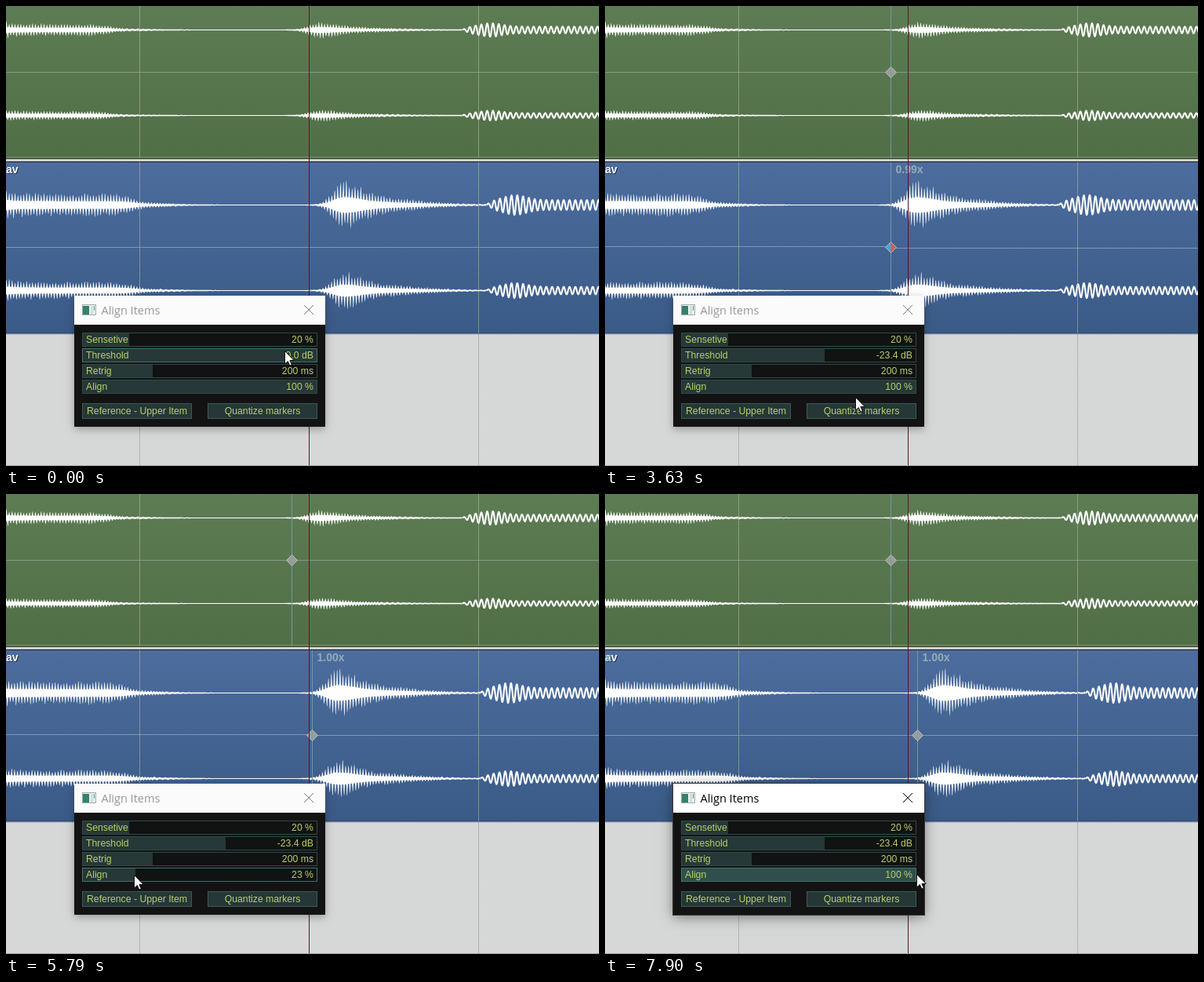
An HTML page with a canvas that plays this animation: 756 px wide and 586 px high, repeating every 8 s.

```html
<!DOCTYPE html>
<html lang="en">
<head>
<meta charset="utf-8">
<title>Align Items</title>
<style>
html, body { margin: 0; width: 100%; height: 100%; overflow: hidden; background: #d6d8d7; }
canvas { display: block; }
</style>
</head>
<body>
<canvas id="stage" width="756" height="586"></canvas>
<script>
const ctx = document.getElementById('stage').getContext('2d');
const W = 756, H = 586, LOOP = 8000;
const HOME = 398, REF = 364;
const DRAG_LAG = 65;
const GREY = '#989c9b', RED = '#c0645a', CYAN = '#48a5dc';
const SMALL = '12.25px "Liberation Sans", Arial, sans-serif';
const BOLD = 'bold 14px "Liberation Sans", Arial, sans-serif';
const TITLE = '14.5px "Open Sans", "Noto Sans", sans-serif';

// The picture advances in steps: six of 250 ms, then 266 ms each.
const stepAt = t => t < 1500 ? Math.floor(t / 250) : 6 + Math.floor((t - 1500) / 266);
const stepTime = i => i < 6 ? i * 250 : 1500 + (i - 6) * 266;

// Key poses of the mouse: ms, x, y.
const mousePath = [
  [0, 355, 439], [400, 355, 444], [1000, 301, 453], [1250, 280, 455], [1500, 280, 455],
  [1766, 321, 428], [2298, 395, 130], [2564, 394, 13], [3096, 385, 330], [3362, 292, 477],
  [3628, 319, 498], [4160, 384, 487], [4958, 248, 485], [5490, 170, 484], [6022, 156, 486],
  [6554, 96, 488], [7086, 96, 488], [7700, 397, 484], [LOOP, 397, 484]
];

function mouseAt(t) {
  const i = Math.max(1, mousePath.findIndex(p => p[0] >= t));
  const [t0, x0, y0] = mousePath[i - 1], [t1, x1, y1] = mousePath[i];
  const k = (t - t0) / (t1 - t0);
  return { x: x0 + (x1 - x0) * k, y: y0 + (y1 - y0) * k };
}

// Sliders follow the mouse slightly late.
function dragged(t) {
  const part = (mouseAt(t - DRAG_LAG).x - 97) / 300;
  return Math.min(1, Math.max(0, part));
}
const thresholdAt = t => t < 250 ? 1 : dragged(Math.min(t, 1500));
const alignAt = t => t < 4160 ? 1 : dragged(t);

// First and last step of every drag; the items are updated between them.
const drags = [[1, 6], [15, 17], [20, 21], [24, 25], [27, 30]];

function stateAt(t) {
  const step = stepAt(t), now = stepTime(step);
  const drag = drags.find(([a, b]) => step >= a && step <= b);
  const applied = alignAt(drag ? stepTime(drag[0] - 1) : now);
  return {
    mouse: mouseAt(now),
    threshold: thresholdAt(now),
    align: alignAt(now),
    focused: !!drag,
    held: step < 7 ? 1 : step < 15 ? -1 : 3,
    marked: step >= 7,
    applied: step < 7 ? 0 : applied
  };
}

function hash(n) {
  const v = Math.sin(n * 12.9898) * 43758.5453;
  return v - Math.floor(v);
}

const fadeOut = (x, center, width) => 1 / (1 + Math.exp((x - center) / width));
const bump = (x, center, rise, fall) => Math.exp(-(((x - center) / (x < center ? rise : fall)) ** 2));

// A decaying noise, a struck burst and a steady tone.
function loudness(x, p) {
  return p.noise * (fadeOut(x, 132, 8) + .22 * fadeOut(x, 190, 12) + .5 * Math.exp(-(x + p.offset) / 10))
    + p.burst * (.55 * bump(x, 400, 19, 28) + .45 * bump(x, 400, 19, 100))
    + p.tone * (fadeOut(-x, -588, 3) + bump(x, 618, 18, 20));
}

function makeWave(p, scale, seed) {
  const body = new Path2D(), tone = new Path2D();
  const toneStart = 582 + p.offset, lower = [];
  let phase = 0;
  body.moveTo(0, 0);
  for (let x = 0; x < toneStart; x += .5) {
    const level = loudness(x - p.offset, p) * scale;
    phase += .5 / (level < 2 ? 7 : 3.7);
    const spike = side => {
      const peak = .55 + .45 * hash(Math.floor(phase) * side + seed);
      return .6 + level * (.28 + .72 * peak * Math.max(0, side * Math.sin(phase * 2 * Math.PI)));
    };
    body.lineTo(x, -spike(1));
    lower.unshift([x, spike(-1)]);
  }
  lower.forEach(([x, y]) => body.lineTo(x, y));
  for (let x = toneStart; x < W + 50; x += .5) {
    const y = loudness(x - p.offset, p) * scale * Math.sin((x - toneStart) / 7.4 * 2 * Math.PI);
    tone.lineTo(x, -y);
  }
  return { body, tone };
}

const green = { offset: 0, noise: 6.5, burst: 11, tone: 4.3 };
const blue = { offset: 31, noise: 12.5, burst: 33, tone: 6.3 };
const greenWaves = [makeWave(green, 1, 1), makeWave(green, .72, 7)];
const blueWaves = [makeWave(blue, 1, 3), makeWave(blue, .76, 9)];

function rect(x, y, w, h, color) {
  ctx.fillStyle = color;
  ctx.fillRect(x, y, w, h);
}

function frame(x, y, w, h, color) {
  ctx.strokeStyle = color;
  ctx.lineWidth = 1;
  ctx.strokeRect(x + .5, y + .5, w - 1, h - 1);
}

function polygon(points, fill, stroke) {
  ctx.beginPath();
  points.forEach(p => ctx.lineTo(...p));
  ctx.closePath();
  ctx.fillStyle = fill;
  ctx.fill();
  if (!stroke) return;
  ctx.strokeStyle = stroke;
  ctx.lineWidth = 1;
  ctx.stroke();
}

function line(x0, y0, x1, y1, color) {
  ctx.beginPath();
  ctx.moveTo(x0, y0);
  ctx.lineTo(x1, y1);
  ctx.strokeStyle = color;
  ctx.lineWidth = 1;
  ctx.stroke();
}

function text(str, x, y, font, color, align = 'left') {
  ctx.font = font;
  ctx.fillStyle = color;
  ctx.textAlign = align;
  ctx.fillText(str, x, y);
}

function gradient(y, h, top, bottom) {
  const g = ctx.createLinearGradient(0, y, 0, y + h);
  g.addColorStop(0, top);
  g.addColorStop(1, bottom);
  rect(0, y, W, h, g);
}

function drawWaves(waves, shift, top) {
  waves.forEach((wave, i) => {
    ctx.save();
    ctx.translate(shift, top + i * 109);
    ctx.fillStyle = ctx.strokeStyle = '#fff';
    ctx.fill(wave.body);
    ctx.lineWidth = 2.1;
    ctx.lineJoin = 'round';
    ctx.stroke(wave.tone);
    ctx.restore();
  });
}

function drawGridLine(x) {
  ctx.setLineDash([1, 1]);
  line(x, 0, x, 194, '#b9c2ae');
  line(x, 199, x, 417, '#c6c09c');
  line(x, 418, x, 585, '#8d8f8e');
  ctx.setLineDash([]);
}

function drawDiamond(x, y, left, right) {
  const top = [x, y - 7], bottom = [x, y + 7];
  polygon([top, [x - 7, y], bottom], left);
  polygon([top, [x + 7, y], bottom], right);
  polygon([top, [x + 7, y], bottom, [x - 7, y]], 'transparent', 'rgba(205,212,210,.7)');
}

function drawTracks({ marked, applied }) {
  const x = Math.floor(HOME - (HOME - REF) * applied);
  rect(0, 0, W, H, '#d6d8d7');
  gradient(0, 194, '#5d7c54', '#516f47');
  rect(0, 84, W, 1, '#87998a');
  rect(0, 192, W, 1, '#78906f');
  rect(0, 194, W, 1, '#3c4b38');
  rect(0, 195, W, 3, '#d0d2d1');
  rect(0, 198, W, 1, '#15191f');
  gradient(199, 218, '#4c6d9d', '#3a5a87');
  rect(0, 416, W, 1, '#304c74');
  rect(0, 417, W, 1, '#7685a0');
  rect(0, 418, W, 1, '#b9bec4');
  rect(0, 585, W, 1, '#a0a2a1');
  rect(0, 307 - Math.ceil(applied), x, 1, '#8196b2');
  rect(x, 307 + Math.floor(applied), W - x, 1, '#8196b2');

  drawWaves(greenWaves, 0, 30.5);
  drawWaves(blueWaves, x - HOME, 253.5);
  [170.5, 602.5].forEach(drawGridLine);

  text('av', 1, 214, BOLD, '#22344f');
  text('av', 0, 213, BOLD, '#fff');
  if (marked) {
    const stretched = applied > .3;
    rect(REF, 0, 1, 194, '#7198a0');
    rect(x, 199, 1, 218, '#7399a0');
    drawDiamond(REF + .5, 84.5, GREY, GREY);
    drawDiamond(x + .5, 307.5, applied === 1 ? CYAN : GREY, stretched ? RED : GREY);
    text(stretched ? '0.99x' : '1.00x', x + 6.5, 213, BOLD, '#93abb9');
    if (!applied) text('x', 0, 213, BOLD, '#93b0b8');
  }
  rect(386, 0, 1, 585, '#571820');
}

function drawRow(y, label, value, amount, held, focused) {
  rect(97, y, 300, 18, '#111212');
  rect(97, y, Math.round(300 * amount), 18, held && focused ? '#304f4c' : '#263837');
  frame(97, y, 300, 18, held ? '#44706b' : '#2f4a48');
  text(label, 102, y + 13, SMALL, '#b9d06c');
  text(value, 392, y + 13, SMALL, '#b9d06c', 'right');
}

function drawButton(x, label) {
  rect(x, 506, 140, 20, '#253736');
  frame(x, 506, 140, 20, '#3b5a57');
  text(label, x + 70, 520, SMALL, '#b9d06c', 'center');
}

function drawTitleBar(focused) {
  rect(87, 369, 320, 37, focused ? '#fff' : '#fbfbfb');
  rect(97, 380, 18, 14, '#edf3f1');
  rect(98, 382, 8, 11, '#35806c');
  rect(108, 382, 3, 11, '#cfe0dc');
  rect(112, 382, 1, 6, '#56907f');
  frame(97, 380, 18, 14, '#a4abab');
  text('Align Items', 121.5, 393, TITLE, focused ? '#000' : '#969696');
  const ink = focused ? '#000' : '#7d7d7d';
  line(380, 381, 392, 393, ink);
  line(392, 381, 380, 393, ink);
}

function drawDialog({ threshold, align, focused, held }) {
  ctx.save();
  ctx.shadowColor = focused ? 'rgba(0,0,0,.45)' : 'rgba(0,0,0,.3)';
  ctx.shadowBlur = focused ? 16 : 10;
  ctx.shadowOffsetY = 3;
  rect(87, 369, 320, 167, '#131313');
  ctx.restore();
  if (focused) frame(86, 368, 322, 169, '#333638');
  drawTitleBar(focused);
  const decibels = (threshold - 1) * 60;
  [
    ['Sensetive', '20 %', .2],
    ['Threshold', decibels.toFixed(1) + ' dB', threshold],
    ['Retrig', '200 ms', .3],
    ['Align', Math.round(align * 100) + ' %', align]
  ].forEach((row, i) => drawRow(416 + i * 20, ...row, i === held, focused));
  drawButton(97, 'Reference - Upper Item');
  drawButton(257, 'Quantize markers');
}

function drawMouse({ x, y }) {
  ctx.save();
  ctx.translate(Math.round(x) + .5, Math.round(y) + .5);
  polygon([[0, 0], [0, 16.5], [3.8, 13], [6.3, 18.5], [8.8, 17.4], [6.4, 12], [11.6, 12]], '#fff', '#111');
  ctx.restore();
}

function render(t) {
  const state = stateAt(t);
  drawTracks(state);
  drawDialog(state);
  drawMouse(state.mouse);
}

const start = performance.now();
function tick() {
  render((performance.now() - start) % LOOP);
  requestAnimationFrame(tick);
}
tick();
</script>
</body>
</html>
```
